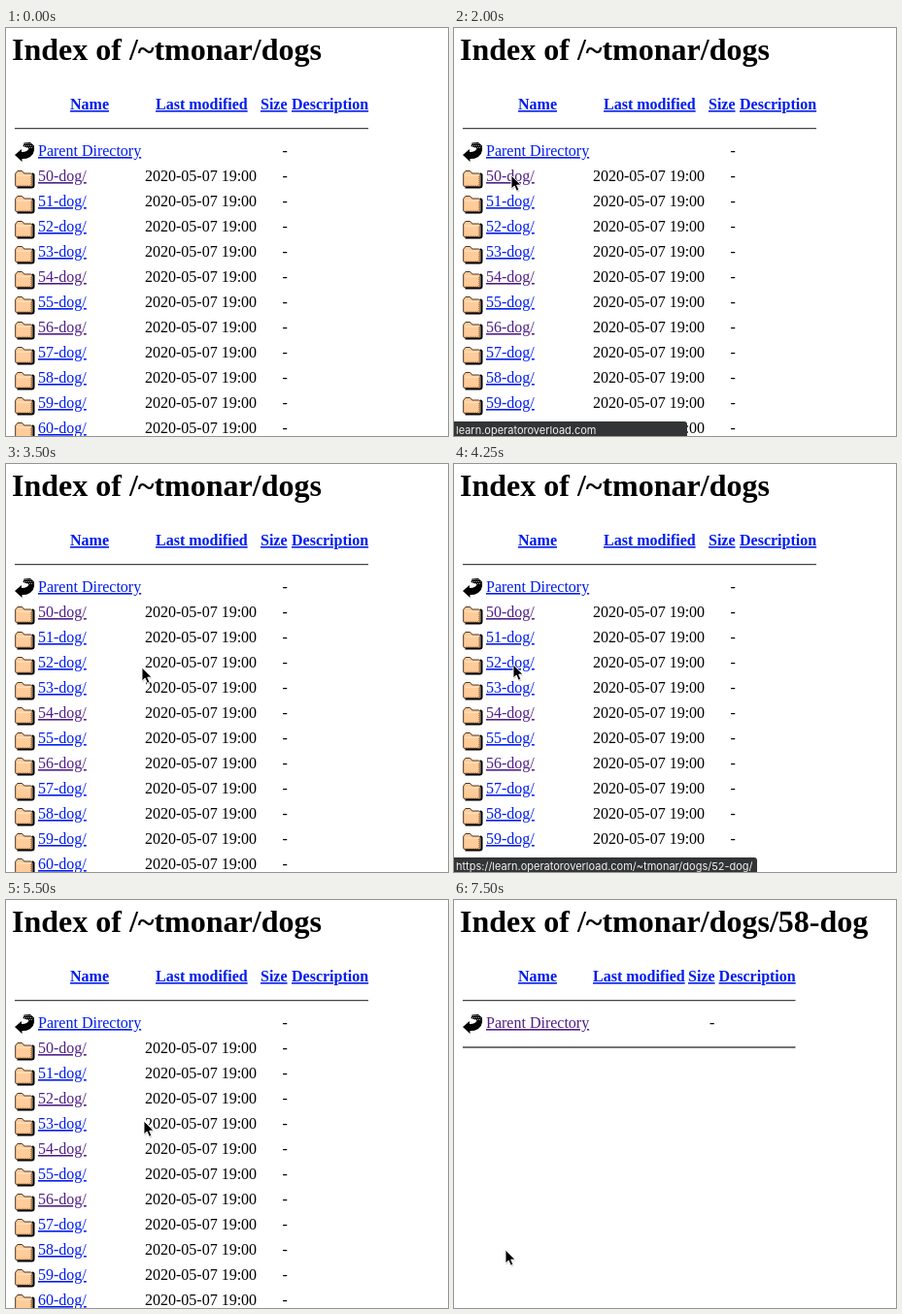
Write an HTML page that moves like this. It is 455x421 px and loops after 8000 ms.

```html
<!DOCTYPE html>
<html lang="en">
<head>
<meta charset="utf-8">
<title>Directory index</title>
<style>
  html, body { margin: 0; width: 100%; height: 100%; overflow: hidden; background: #fff; }
  svg { display: block; width: 455px; height: 421px; font: 16px "Liberation Serif", Times, serif; }
  .title { font-size: 32px; font-weight: bold; }
  .head { font-weight: bold; }
  .link { fill: #001cee; text-decoration: underline; }
  .seen { fill: #4f1f86; }
  .rule { stroke: #444; stroke-width: 1.3; }
  .bubble text { font: 11px Inter, "Liberation Sans", sans-serif; fill: #f2f2f2; }
</style>
</head>
<body>
<svg viewBox="0 0 455 421">
  <defs>
    <g id="folder">
      <path d="M2.5 18.5H17.5Q19.5 18.5 19.5 16.5V5.5L18 4" fill="none" stroke="#000" stroke-width="2"/>
      <path d="M.7 4.2 2.8 1.5H7.6L9.6 4H16.5Q18 4 18 5.5V16Q18 17.6 16.5 17.6H2.3Q.7 17.6.7 16Z"
            fill="#fc9" stroke="#4a3423"/>
      <path d="M2 6.2H16.5" stroke="#ffe6cc"/>
      <path d="M3 16.4H16.5V7" fill="none" stroke="#b98152" stroke-dasharray="1 1"/>
    </g>
    <g id="up">
      <path d="M0 13.5 7 7.5V10.5Q13.5 10.5 14.5 6.5L8.5 4.5 9.5 1 16 .5 20 4Q21.5 14.5 12 17.2L7.5 17.6V20.5Z" fill="#000"/>
      <path d="M9.5 2H17M10 4H18.5M13 6H19" stroke="#aaa" stroke-dasharray="1 1"/>
    </g>
  </defs>
  <g id="page"></g>
  <g id="back">
    <circle cx="-2" cy="211" r="64" fill="#c8c8c8" fill-opacity=".87"/>
    <path d="M45 211H14M27 197.5 13.5 211 27 224.5" fill="none" stroke="#fff" stroke-opacity=".85" stroke-width="4"/>
  </g>
  <g id="bubble" class="bubble">
    <path id="bar" fill="#333436"/>
    <text id="url" x="2" y="418.5"></text>
  </g>
  <g id="cursor">
    <path d="M.5 1.5V15.5L3.8 12.5 6 17.5 8.6 16.4 6.500 11.5H10.8Z" fill="#000" opacity=".18"/>
    <path d="M0 0V14L3.2 11 5.4 16.2 7.9 15.1 5.7 10.1H10Z" fill="#000" stroke="#fff" stroke-width=".9"/>
  </g>
</svg>
<script>
(() => {
  const $ = id => document.getElementById(id);
  const ROOT = "/~tmonar/dogs";
  const HOST = "learn.operatoroverload.com";

  const text = (x, y, s, cls = "") => `<text x="${x}" y="${y}" class="${cls}">${s}</text>`;
  const rule = (y, end) => `<path class="rule" d="M9 ${y}H${end}"/>`;
  const icon = (name, y) => `<use href="#${name}" x="9" y="${y}"/>`;

  function header(path, cols, end, dashX, parentCls) {
    const names = ["Name", "Last modified", "Size", "Description"];
    return text(6, 33, "Index of " + path, "title") +
      names.map((n, i) => text(cols[i], 84, n, "head link")).join("") +
      rule(103.6, end) + icon("up", 117.5) +
      text(33, 132, "Parent Directory", parentCls) + text(dashX, 132, "-");
  }

  function listPage(seen) {
    let out = header(ROOT, [66, 154, 262, 294], 373, 284.4, "link");
    for (let i = 0; i <= 10; i++) {
      const n = 50 + i, y = 158 + 26 * i;
      out += icon("folder", y - 12) +
        text(33, y, n + "-dog/", seen.includes(n) ? "link seen" : "link") +
        text(143, y, "2020-05-07 19:00") + text(284.4, y, "-");
    }
    return out;
  }

  const dogPage = n =>
    header(`${ROOT}/${n}-dog`, [66, 143, 241, 272.6], 351.5, 263, "link seen") + rule(152, 351.5);

  const pages = {
    first: listPage([50, 54, 56]),
    second: listPage([50, 52, 54, 56]),
    50: dogPage(50), 52: dogPage(52), 58: dogPage(58)
  };

  // time, page, cursor x, y, extras
  const steps = [
    [0, "first"],
    [250, "first", 156, 128],
    [500, "first", 139, 134],
    [750, "first", 120, 143],
    [1000, "first", 101, 150],
    [1250, "first", 87, 154],
    [1500, "first", 70, 153],
    [1750, "first", 60, 152],
    [2000, "first", 59, 152, { url: "short" }],
    [2250, 50, 112, 184],
    [2500, 50, 158, 210],
    [3250, 50, 158, 210, { back: true }],
    [3500, "first", 140, 210],
    [3750, "first", 95, 208],
    [4000, "first", 66, 207, { url: "short" }],
    [4250, "first", 61, 207, { url: "full" }],
    [4500, 52, 61, 207],
    [5000, 52, 120, 224],
    [5250, 52, 142, 228, { back: true }],
    [5500, "second", 142, 228],
    [5750, "second", 125, 262],
    [6000, "second", 95, 291],
    [6250, "second", 74, 318],
    [6500, "second", 55, 342],
    [6750, "second", 53, 355],
    [7000, "second", 53, 361],
    [7250, "second", 53, 361, { url: "short" }],
    [7500, 58, 53, 361]
  ];

  const bubbles = {
    short: [240, HOST],
    full: [312, `https://${HOST}${ROOT}/52-dog/`]
  };

  const show = (id, on) => $(id).setAttribute("visibility", on ? "visible" : "hidden");
  let shownPage, shownStep;

  function draw(t) {
    const step = steps.filter(s => s[0] <= t).pop();
    if (step === shownStep) return;
    shownStep = step;
    const [, page, x, y, extra = {}] = step;
    if (page !== shownPage) $("page").innerHTML = pages[shownPage = page];
    show("cursor", x !== undefined);
    if (x !== undefined) $("cursor").setAttribute("transform", `translate(${x} ${y})`);
    show("back", extra.back);
    show("bubble", extra.url);
    if (extra.url) {
      const [w, url] = bubbles[extra.url];
      $("bar").setAttribute("d", `M0 406H${w - 3}Q${w} 406 ${w} 409V421H0Z`);
      $("url").textContent = url;
    }
  }

  const start = performance.now();
  function tick() {
    draw((performance.now() - start) % 8000);
    requestAnimationFrame(tick);
  }
  tick();
})();
</script>
</body>
</html>
```
